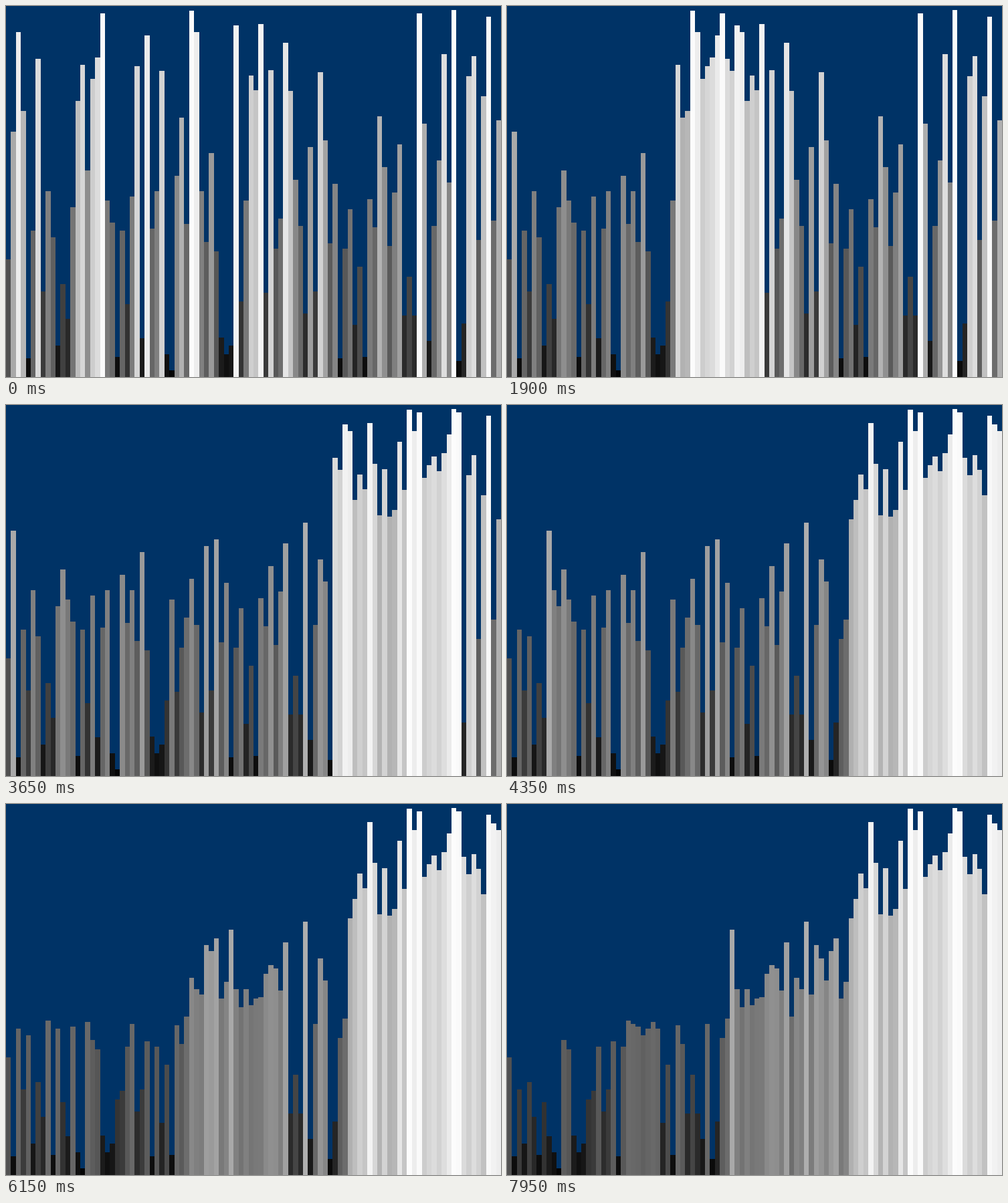
Write a matplotlib script that moves like this. It is 740 by 555 pixels and loops after 8 s.

```python
from itertools import islice

import matplotlib.pyplot as plt
import numpy as np
from matplotlib.animation import FuncAnimation

WIDTH, HEIGHT, DPI = 740, 555, 74
LOOP_MS, FRAME_MS = 8000, 50
STEP_MS, OFFSET_MS = 40, 20  # one comparison per step

# Distance from the top of the stage to each unsorted bar.
TOPS = [
    379, 188, 39, 157, 527, 336, 79, 427, 277, 346,
    508, 416, 468, 301, 142, 88, 246, 109, 77, 11,
    291, 324, 525, 336, 446, 285, 90, 497, 44, 333,
    277, 97, 521, 545, 254, 167, 326, 7, 39, 277,
    353, 220, 367, 496, 521, 508, 29, 442, 291, 104,
    126, 27, 429, 96, 363, 318, 55, 127, 260, 329,
    460, 211, 427, 99, 201, 355, 266, 527, 363, 304,
    477, 390, 525, 289, 331, 165, 241, 359, 279, 207,
    463, 405, 463, 11, 176, 501, 329, 231, 72, 264,
    6, 531, 475, 105, 75, 350, 135, 16, 321, 171,
]


def quicksort(values, low, high):
    """Sort in place, yielding a copy after every comparison or pivot move."""
    if low >= high:
        return
    pivot, slot = values[high], low
    for j in range(low, high):
        if values[j] < pivot:
            values[slot], values[j] = values[j], values[slot]
            slot += 1
        yield values.copy()
    values[slot], values[high] = values[high], values[slot]
    yield values.copy()
    yield from quicksort(values, low, slot - 1)
    yield from quicksort(values, slot + 1, high)


heights = [HEIGHT - top for top in TOPS]
step_count = (LOOP_MS + OFFSET_MS) // STEP_MS
states = list(islice(quicksort(heights.copy(), 0, len(heights) - 1), step_count))

fig = plt.figure(figsize=(WIDTH / DPI, HEIGHT / DPI), dpi=DPI, facecolor="#003366")
ax = fig.add_axes([0, 0, 1, 1])
ax.set_xlim(0, WIDTH)
ax.set_ylim(0, HEIGHT)
ax.axis("off")

edges = np.round(np.linspace(0, WIDTH, len(heights) + 1))
bars = ax.bar(edges[:-1], heights, width=np.diff(edges), align="edge", linewidth=0)


def update(frame):
    step = (frame * FRAME_MS + OFFSET_MS) // STEP_MS
    for bar, height in zip(bars, states[step]):
        bar.set_height(height)
        bar.set_facecolor(str(height / HEIGHT))
    return bars


animation = FuncAnimation(
    fig, update, frames=LOOP_MS // FRAME_MS, interval=FRAME_MS,
    repeat=True, repeat_delay=0, blit=False,
)
plt.show()
```
